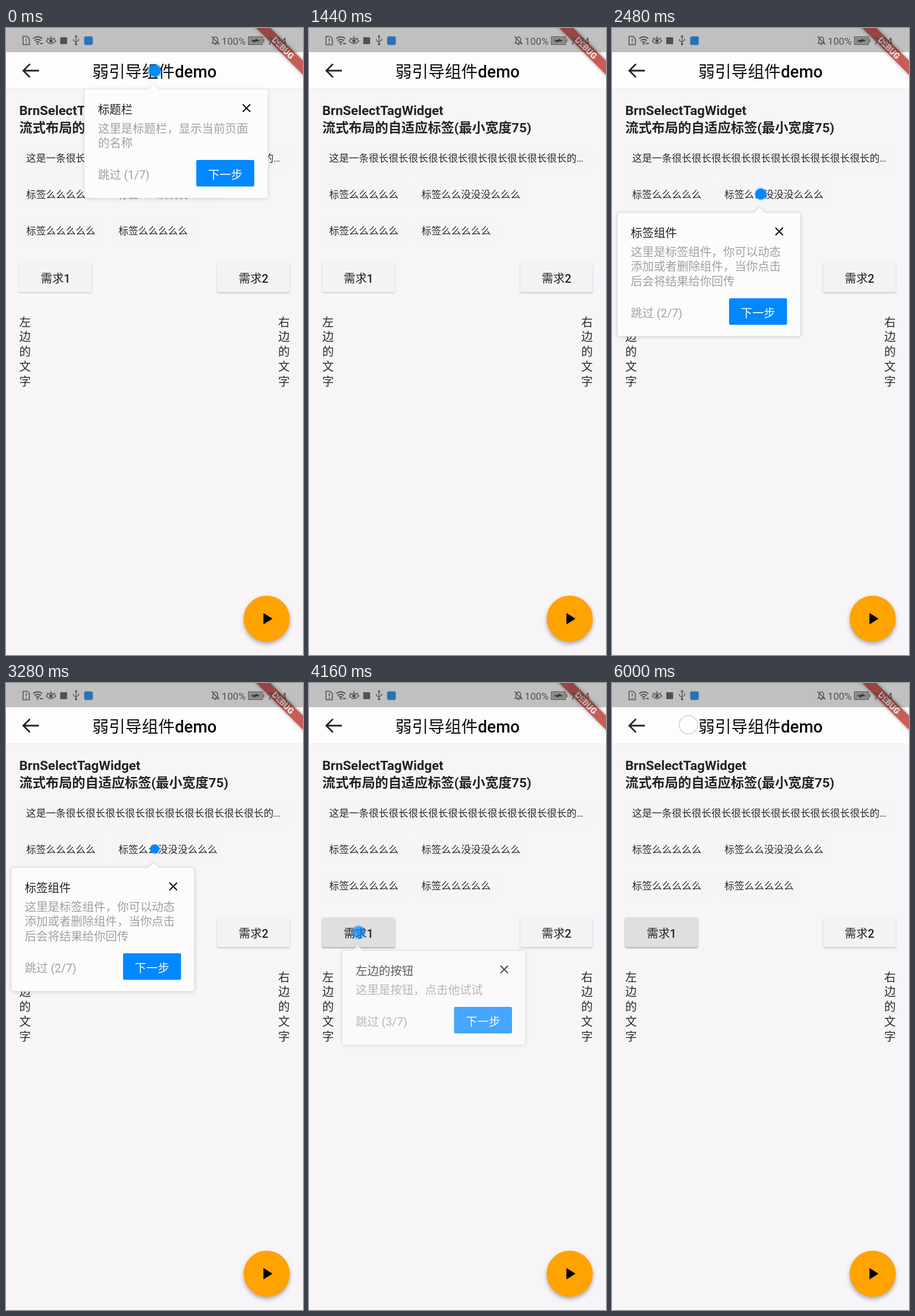
Write an HTML page with a canvas that moves like this. It is 515 px wide and 1088 px high and loops after 6.08 s.

```html
<!DOCTYPE html>
<html lang="zh-CN">
<head>
<meta charset="utf-8">
<style>
html, body { margin: 0; width: 100%; height: 100%; overflow: hidden; background: #f7f5f8; }
canvas { display: block; }
</style>
</head>
<body>
<canvas id="stage" width="515" height="1088"></canvas>
<script>
const W = 515, H = 1088, DP = W / 360;
const screen = document.getElementById('stage').getContext('2d');
const layer = new OffscreenCanvas(W, H).getContext('2d');
let c = screen;

const LOOP = 6080, FADE_OUT = 260, FADE_IN = 280;
const FONT = 'Roboto, "Noto Sans CJK SC", "Noto Sans CJK", sans-serif';
const SMALL = 12 * DP, BODY = 14 * DP, HEADING = 16 * DP, TITLE = 20 * DP;
const INK = '#222', BLUE = '#0088ff', ICON = '#535153';

const guides = [
  { x: 136, y: 106, h: 189, dot: [258, 74], arrow: 256, title: '标题栏', n: 1, from: -1000, to: 1160,
    lines: ['这里是标题栏，显示当前页面', '的名称'] },
  { x: 9, y: 320, h: 215, dot: [258, 288], arrow: 256, title: '标签组件', n: 2, from: 1520, to: 3720,
    lines: ['这里是标签组件，你可以动态', '添加或者删除组件，当你点击', '后会将结果给你回传'] },
  { x: 57.5, y: 464, h: 164, dot: [86, 432.5], arrow: 84.5, title: '左边的按钮', n: 3, from: 3960, to: 4880,
    lines: ['这里是按钮，点击他试试'] }
];
const pulses = [-320, 900, 2320, 3840];
const taps = [[385, 255, 1040, 1280], [261, 484, 3680, 3920], [334.5, 491, 4800, 5040], [132.5, 72.5, 6000, 6160]];

const clamp = v => Math.max(0, Math.min(1, v));

function text(s, x, y, size, color = INK, weight = 400, align = 'left') {
  c.font = `${weight} ${size}px ${FONT}`;
  c.fillStyle = color;
  c.textAlign = align;
  c.fillText(s, x, y + size * 0.375);
}

function box(x, y, w, h, r, fill) {
  c.beginPath();
  c.roundRect(x, y, w, h, r);
  c.fillStyle = fill;
  c.fill();
}

function disc(x, y, r, fill) {
  c.beginPath();
  c.arc(x, y, r, 0, Math.PI * 2);
  c.fillStyle = fill;
  c.fill();
}

function shape(d, fill) {
  c.fillStyle = fill;
  c.fill(new Path2D(d));
}

function stroke(d, color, width) {
  c.strokeStyle = color;
  c.lineWidth = width;
  c.stroke(new Path2D(d));
}

function withShadow(color, blur, dy, draw) {
  c.save();
  c.shadowColor = color;
  c.shadowBlur = blur;
  c.shadowOffsetY = dy;
  draw();
  c.restore();
}

function debugBanner() {
  c.save();
  c.translate(W, 0);
  c.rotate(Math.PI / 4);
  withShadow('rgba(0,0,0,.4)', 6, 0, () => box(-70, 28 * DP, 140, 12 * DP, 0, '#c65e56'));
  text('DEBUG', 0, 34 * DP, 10.2 * DP, '#f6e9e8', 900, 'center');
  c.restore();
}

function statusBar() {
  c.fillStyle = 'rgba(0,0,0,.245)';
  c.fillRect(0, 0, W, 42);
  stroke('M29.5 14.5h7l4 4v10.5h-11zM35 18v5M35 25v2', ICON, 1.6);
  stroke('M47 18.5q8-6.5 16 0M49.5 22q5.5-4.5 11 0M52 25q3-2.5 6 0M59 27h5', ICON, 1.8);
  disc(55, 27.5, 1.6, ICON);
  stroke('M69.5 22.5q8.5-9 17 0q-8.5 9-17 0M71 17l2 2M85 17l-2 2M78 14v3', ICON, 1.5);
  disc(78, 22.5, 3, ICON);
  box(94, 16, 12, 12, 1, ICON);
  stroke('M121.5 14v14M117 19v3l4.5 3M126 18v3l-4.5 3M119.5 16l2-3l2 3', ICON, 1.3);
  disc(121.5, 28, 2, ICON);
  box(135.5, 14.5, 15, 15, 3, '#2873b5');
  stroke('M357.5 26.5h11l-1.5-2v-5q-1-4-4-4q-3 0-4 4v5zM361 28.5h4M356.5 14.5l13 14', ICON, 1.5);
  text('100%', 374, 22.5, SMALL, ICON);
  stroke('M420.5 15.5h24v13h-24zM447 19v6', ICON, 1.5);
  box(422, 17, 21, 10, 0, '#888688');
  shape('M425 21.5l8-1v-2l7 4l-8 1v2z', '#333');
  text('7:04', 453.5, 22.5, SMALL, '#4b4446');
}

function button(x, label, fill, shade) {
  withShadow(`rgba(0,0,0,${shade})`, 2.5, 1.2, () => box(x, 407, 88 * DP, 36 * DP, 2.5, fill));
  text(label, x + 44 * DP, 434, BODY, INK, 500, 'center');
}

function tag(s, x, y, w) {
  box(x, y - 23, w, 46, 3, '#f5f4f7');
  text(s, x + 12, y, SMALL, '#2a2a2a');
}

function column(s, x) {
  [...s].forEach((ch, i) => text(ch, x, 510 + i * 18 * DP, BODY, '#2a2a2a'));
}

function page(t) {
  c.fillStyle = '#f7f5f8';
  c.fillRect(0, 0, W, H);
  withShadow('rgba(0,0,0,.06)', 2, 1, () => box(0, 0, W, 105, 0, '#fdfdfd'));
  stroke('M30 74H57M41.5 62.5L30 74l11.5 11.5', INK, 2.8);
  text('弱引导组件demo', W / 2, 75.5, TITLE, '#0c0c0c', 500, 'center');
  text('BrnSelectTagWidget', 23, 142.5, HEADING, INK, 700);
  text('流式布局的自适应标签(最小宽度75)', 23, 172.4, HEADING, INK, 700);
  tag('这是一条' + '很长'.repeat(10) + '的…', 23, 226, 469);
  tag('标签么么么么么', 23, 289, 143);
  tag('标签么么没没没么么么', 183, 289, 194);
  tag('标签么么么么么', 23, 352, 143);
  tag('标签么么么么么', 183, 352, 143);
  const pressed = t > 3000;
  button(22.9, '需求1', pressed ? '#e0dee1' : '#f4f2f5', pressed ? 0.4 : 0.2);
  button(366.2, '需求2', '#f4f2f5', 0.24);
  column('左边的文字', 22.9);
  column('右边的文字', 472.1);
  withShadow('rgba(60,60,90,.4)', 7, 4, () => disc(452.1, 1025.1, 28 * DP, '#ffa300'));
  shape('M446.4 1015v20l15.7-10z', '#000');
  debugBanner();
  statusBar();
}

function beacon([x, y], t) {
  const start = pulses.find(p => t >= p && t < p + 800);
  const swell = start === undefined ? 0 : Math.sin((t - start) / 800 * Math.PI);
  disc(x, y, 8 + 4.5 * swell, 'rgba(0,136,255,.45)');
  disc(x, y, 8 + 2 * swell, BLUE);
}

function bubble({ x, y, h, arrow, title, lines, n }) {
  const w = 318, bottom = y + h, left = x + 23.5;
  const outline = `M${x + 5} ${y}H${arrow - 9}l9-9l9 9H${x + w - 5}q5 0 5 5V${bottom - 5}q0 5-5 5H${x + 5}q-5 0-5-5V${y + 5}q0-5 5-5z`;
  withShadow('rgba(0,0,0,.16)', 7, 1, () => shape(outline, '#fcfcfd'));
  stroke(outline, n === 1 ? '#ececee' : '#d9d9dc', 1);
  text(title, left, y + 35, BODY);
  stroke(`M${x + 274.5} ${y + 26.5}l13 13m0-13l-13 13`, '#111', 2.2);
  lines.forEach((s, i) => text(s, left, y + 68 + i * 25.9, BODY, '#a0a0a0'));
  text(`跳过 (${n}/7)`, left, bottom - 41, BODY, '#a0a0a0');
  box(x + 194, bottom - 66, 100.5, 46, 2.5, BLUE);
  text('下一步', x + 244.2, bottom - 41, BODY, '#fff', 400, 'center');
}

// Each guide is drawn on its own layer so that it fades as one piece.
function guide(g, t) {
  const alpha = Math.min(clamp((t - g.from) / FADE_IN), clamp((g.to + FADE_OUT - t) / FADE_OUT));
  if (!alpha) return;
  c = layer;
  c.clearRect(0, 0, W, H);
  beacon(g.dot, t);
  bubble(g);
  c = screen;
  c.globalAlpha = alpha;
  c.drawImage(layer.canvas, 0, 0);
  c.globalAlpha = 1;
}

function tap([x, y, from, to], t) {
  if (t < from || t > to) return;
  c.globalAlpha = clamp((to - t) / 160);
  disc(x, y, 16, 'rgba(255,255,255,.3)');
  c.strokeStyle = '#dcdcde';
  c.lineWidth = 2;
  c.stroke();
  c.globalAlpha = 1;
}

function frame(now) {
  const t = now % LOOP;
  page(t);
  guides.forEach(g => guide(g, t));
  taps.forEach(p => tap(p, t));
  requestAnimationFrame(frame);
}
requestAnimationFrame(frame);
</script>
</body>
</html>
```
